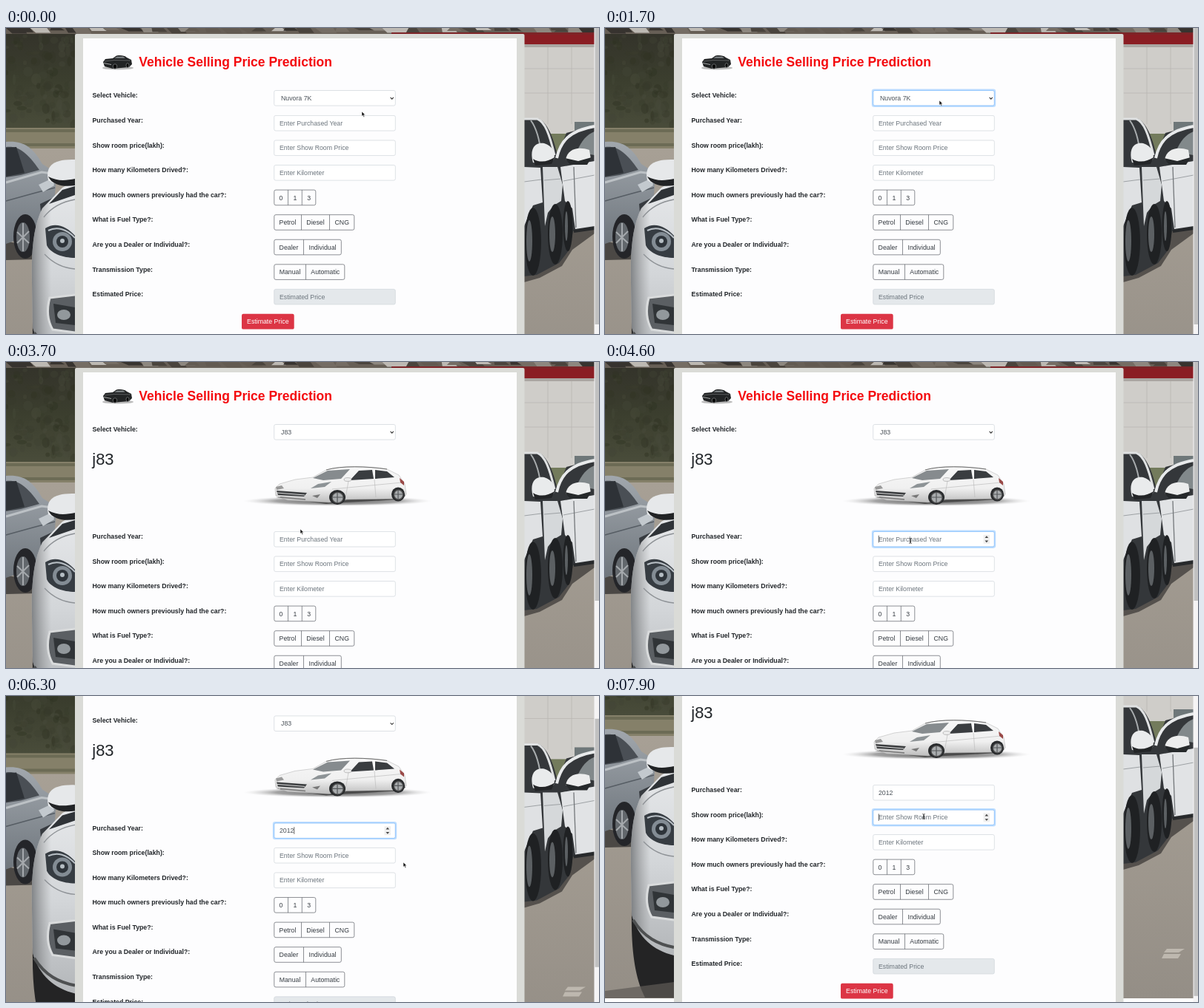
Write an HTML page that moves like this. It is 800 px wide and 414 px high and loops after 8 s.

```html
<!DOCTYPE html>
<html lang="en">
<head>
<meta charset="utf-8">
<title>Vehicle Selling Price Prediction</title>
<style>
html, body { margin: 0; width: 100%; height: 100%; overflow: hidden; background: #fff; }
svg { display: block; width: 100%; height: 100%; }
text { font: 8.755px "Liberation Sans", Arial, sans-serif; fill: #495057; white-space: pre; }
.label { font-weight: bold; fill: #212529; }
.title { font-size: 17.5px; font-weight: bold; fill: #f40b0f; }
.head { font-size: 21.9px; fill: #212529; }
.hint { fill: #6c757d; }
.btn { fill: #343a40; text-anchor: middle; }
.box { fill: #fff; stroke: #ced4da; stroke-width: .7; }
.off { fill: #e4e8eb; }
.group { fill: none; stroke: #5c6167; stroke-width: .7; }
.glow { fill: none; stroke: #bfdeff; stroke-width: 2.2; }
.edge { fill: none; stroke: #80bdff; stroke-width: .7; }
.scroll { --k: 1; animation: scroll 8s linear infinite; }
.thumb { --k: -.76; }
.rest { animation: grow 8s step-end infinite; }
.pointer { animation: point 8s ease-in-out infinite; }
@keyframes scroll {
  0%, 74.4% { transform: translateY(0); }
  78.75% { transform: translateY(calc(var(--k) * -57.4px)); animation-timing-function: ease-out; }
  85.5%, 100% { transform: translateY(calc(var(--k) * -109px)); }
}
@keyframes grow {
  0% { transform: translateY(0); }
  26.25%, 100% { transform: translateY(111px); }
}
@keyframes point {
  0%, 3% { transform: translate(480px, 113px); }
  14%, 35% { transform: translate(451px, 98px); }
  46.25% { transform: translate(397px, 226px); }
  52%, 70% { transform: translate(412px, 242px); }
  74.5%, 86% { transform: translate(536px, 225px); }
  91.25%, 92.5% { transform: translate(462px, 187px); }
  95.5%, 100% { transform: translate(430px, 163px); }
}
</style>
</head>
<body>
<svg viewBox="0 0 800 414" preserveAspectRatio="none">
  <defs>
    <linearGradient id="trees" x2="0" y2="1">
      <stop offset="0" stop-color="#33322a"/><stop offset=".5" stop-color="#3b3e2e"/><stop offset="1" stop-color="#4a4d3b"/>
    </linearGradient>
    <linearGradient id="ground" x2="0" y2="1">
      <stop offset="0" stop-color="#b0a89c"/><stop offset="1" stop-color="#948e86"/>
    </linearGradient>
    <linearGradient id="white" x2="0" y2="1">
      <stop offset="0" stop-color="#e6e8ea"/><stop offset=".5" stop-color="#d3d6d9"/><stop offset="1" stop-color="#b3b6b9"/>
    </linearGradient>
    <linearGradient id="side">
      <stop offset="0" stop-color="#55585b" stop-opacity=".65"/><stop offset=".45" stop-color="#777" stop-opacity="0"/>
    </linearGradient>
    <linearGradient id="silver" x2="0" y2="1">
      <stop offset="0" stop-color="#a1a7ad"/><stop offset="1" stop-color="#6f767d"/>
    </linearGradient>
    <linearGradient id="body" x2="0" y2="1">
      <stop offset="0" stop-color="#f7f7f7"/><stop offset=".6" stop-color="#f0f0f0"/><stop offset="1" stop-color="#bdbdbd"/>
    </linearGradient>
    <radialGradient id="shade">
      <stop offset="0" stop-color="#444" stop-opacity=".9"/><stop offset=".65" stop-color="#666" stop-opacity=".6"/><stop offset="1" stop-color="#ccc" stop-opacity="0"/>
    </radialGradient>
  </defs>

  <g class="scroll">
    <!-- backdrop, left -->
    <rect width="800" height="518" fill="url(#ground)"/>
    <rect width="100" height="140" fill="url(#trees)"/>
    <g id="leaves"></g>
    <rect y="135" width="100" height="28" fill="#858069"/>
    <path d="M0 139H93M0 158H93" stroke="#6c6b55" stroke-width="4"/>
    <path d="M0 288L42 298L42 313L0 314Z" fill="#4b4845"/>
    <path d="M0 154C22 152 36 160 49 184L63 193L67 212L65 240L58 264L40 278L0 292Z" fill="url(#silver)"/>
    <path d="M0 161C15 159 27 166 45 192L20 199L0 202Z" fill="#4a4f55"/>
    <path d="M0 162L14 161L25 196L0 201Z" fill="#2e3237"/>
    <path d="M0 209L48 195L63 197" fill="none" stroke="#bcc1c5" stroke-width="3"/>
    <path d="M0 234L36 224L66 216" fill="none" stroke="#565d64" stroke-width="1.5"/>
    <path d="M44 212L63 203L65 213L50 222Z" fill="#c3c9ce"/>
    <path d="M46 238L65 229L62 250L48 261Z" fill="#373b40"/>
    <ellipse cx="26" cy="282" rx="16" ry="30" fill="#242529"/>
    <ellipse cx="23" cy="283" rx="9" ry="20" fill="#62676c"/>
    <path d="M23 264V302M15 276L31 291M15 291L31 275" stroke="#a5a9ad" stroke-width="2"/>
    <path d="M36 398L60 438L93 450V517H54C40 490 35 450 36 398Z" fill="#242425"/>
    <path d="M0 508L93 496V518H0Z" fill="#5f5b56" opacity=".7"/>
    <g id="suv">
      <path d="M93 206L76 216L49 244C37 268 34 300 35 345L36 405C45 436 65 453 93 460Z" fill="url(#white)"/>
      <path d="M93 206L76 216L49 244C37 268 34 300 35 345L36 405C45 436 65 453 93 460Z" fill="url(#side)"/>
      <path d="M93 214L76 219L58 238L93 226Z" fill="#2f3337"/>
      <path d="M93 232C76 235 61 243 51 256M52 306C66 321 80 325 93 326" fill="none" stroke="#8e9296" stroke-width="1.3"/>
      <path d="M53 271C66 262 82 268 93 281V311C77 311 60 305 55 294Z" fill="#363c42"/>
      <path d="M57 274C69 268 82 272 93 284" fill="none" stroke="#b9c0c6" stroke-width="2"/>
      <circle cx="76" cy="289" r="13" fill="#838c94"/><circle cx="76" cy="289" r="8" fill="#2e343a"/><circle cx="76" cy="288" r="3" fill="#b5bdc3"/>
      <path d="M93 361L59 365C55 380 56 396 63 408L93 412" fill="#5b5f63" stroke="#d9dbdc" stroke-width="3"/>
      <path d="M64 373L93 378V402L67 399Z" fill="#303437"/><ellipse cx="78" cy="388" rx="9" ry="7" fill="#92989c"/>
      <path d="M38 412C53 436 72 445 93 449" fill="none" stroke="#4e5051" stroke-width="4"/>
      <path d="M57 206C53 188 62 177 93 178V210C78 213 65 212 57 206Z" fill="#e6e8ea"/>
      <path d="M57 201C70 208 82 206 93 204V213C80 215 63 214 57 201Z" fill="#212325"/>
    </g>

    <!-- backdrop, right -->
    <rect x="695" width="105" height="150" fill="#cfcdc9"/>
    <path d="M699 55H794M699 88H794M731 26V130M763 26V130" stroke="#b9b7b3" stroke-width=".8"/>
    <rect x="695" y="8" width="105" height="15" fill="#8a1d23"/>
    <rect x="695" y="22" width="105" height="4" fill="#aaa6a2"/>
    <rect x="767" y="127" width="27" height="17" fill="#6e7779"/>
    <rect x="695" y="143" width="105" height="28" fill="#737b5c"/>
    <path d="M699 270H794V278L764 300L750 322L720 338L699 344Z" fill="#55514d"/>
    <path d="M699 122H718C730 128 738 146 744 172L756 142L794 132V270L765 275L760 300L746 318L716 334L699 336Z" fill="#34373a"/>
    <path d="M699 123H717C727 127 733 143 740 172" fill="none" stroke="#dfe1e2" stroke-width="3"/>
    <path d="M708 125C716 136 720 150 722 172" fill="none" stroke="#a9adaf" stroke-width="2"/>
    <path d="M743 176C748 153 760 139 794 133" fill="none" stroke="#e8eaeb" stroke-width="4"/>
    <path d="M770 168C776 152 784 144 794 140V172Z" fill="#82898b"/>
    <path d="M699 188L721 189L724 236L711 240L704 256L699 268Z" fill="#dfe1e3"/>
    <path d="M724 188L744 188L751 212L749 234L739 240L731 250L727 268Z" fill="#d5d8da"/>
    <path d="M748 188L794 180V268L768 272L764 244L754 234Z" fill="#e1e3e5"/>
    <path d="M699 208L722 205M726 206L749 204M752 207L794 199" stroke="#9da1a4" fill="none"/>
    <path d="M766 188L769 270" stroke="#74787b" stroke-width="1.3"/>
    <path d="M766 275L794 271" stroke="#27292b" stroke-width="4"/>
    <g fill="#1f2123">
      <ellipse cx="711" cy="289" rx="11" ry="46"/><ellipse cx="741" cy="279" rx="10" ry="41"/><ellipse cx="758" cy="268" rx="6.5" ry="34"/>
    </g>
    <g fill="#5c6063">
      <ellipse cx="706" cy="288" rx="4" ry="28"/><ellipse cx="737" cy="279" rx="4" ry="24"/><ellipse cx="756" cy="268" rx="2" ry="20"/>
    </g>
    <path d="M711 182C706 164 713 154 726 156C737 159 742 169 739 178L726 184Z" fill="#e9ebec"/>
    <path d="M711 177C720 183 731 181 740 175L736 184L714 186Z" fill="#232527"/>
    <path d="M755 178C758 163 772 160 787 165L789 177L772 182Z" fill="#eceded"/>
    <path d="M754 176L772 180L790 175L784 185H761Z" fill="#26292b"/>
    <path d="M758 451H782L774 456H754ZM754 458H777L773 464H751Z" fill="#beb8af"/>
    <g id="strip"></g>

    <!-- card -->
    <rect x="93" y="8" width="606.5" height="540" rx="2" fill="#dadbd7"/>
    <rect x="104" y="14" width="585" height="540" fill="#fdfdfe"/>
    <g>
      <ellipse cx="151" cy="54" rx="21" ry="2.5" fill="#bbb"/>
      <path d="M131 46L134 42L144 41L149 37.5C154 36.5 160 37 163 40L169 43L170 49L166 53L144 55L133 52Z" fill="#222425"/>
      <path d="M146 41L150 38.5L158 38.5L161 41Z" fill="#777c7e"/>
      <path d="M133 45L146 43.5L168 44" fill="none" stroke="#77797a" stroke-width=".7"/>
      <path d="M132 47.5L142 49.5" stroke="#a5a7a8"/>
      <g fill="#080808" stroke="#77797a" stroke-width=".8"><ellipse cx="147" cy="52" rx="2.8" ry="3.3"/><ellipse cx="164" cy="50.5" rx="2" ry="3"/></g>
    </g>
    <text class="title" x="179.3" y="52">Vehicle Selling Price Prediction</text>
    <g id="top"></g>
    <g id="car">
      <ellipse cx="447" cy="188" rx="127" ry="7" fill="url(#shade)"/>
      <path d="M364 183L432 192L458 190L530 186L539 181L535 177L440 182Z" fill="#4a4a4a"/>
      <path d="M363 171L369 165L390 159L414 156L432 146C452 140 488 141 514 145L530 153L538 165L540 179L529 185L460 186L436 190L380 187L364 181Z" fill="url(#body)" stroke="#aaa" stroke-width=".5"/>
      <path d="M414 157L434 147L464 145L452 158L428 160Z" fill="#868b8e"/>
      <path d="M464 160L476 147L494 146L496 158ZM498 146L514 148L524 156L498 158Z" fill="#3a3d40"/>
      <path d="M432 146C452 140 488 141 514 145" fill="none" stroke="#6a6a6a" stroke-width="1"/>
      <path d="M462 161L458 184M497 159L499 183M440 172L534 163" fill="none" stroke="#bdbdbd" stroke-width=".7"/>
      <path d="M411 171L421 165L439 162L430 169Z" fill="#8d9396"/>
      <path d="M364 169L372 167L375 171L365 173Z" fill="#999"/>
      <path d="M365 174L406 177L402 182L367 180Z" fill="#3b3d3f"/>
      <path d="M366 177L403 180" stroke="#ddd" stroke-width="1"/>
      <path d="M370 183L404 186" stroke="#777" stroke-width="1.5"/>
      <path d="M413 181L424 179L420 184Z" fill="#777"/>
      <ellipse cx="461" cy="159" rx="5" ry="2.4" fill="#eee" stroke="#888" stroke-width=".5"/>
      <path d="M531 157L537 162L537 167L532 163Z" fill="#9a4a48"/>
      <g fill="#292b2d"><ellipse cx="447" cy="183" rx="11" ry="10"/><ellipse cx="529" cy="179" rx="9" ry="9.6"/></g>
      <g fill="#a9acae" stroke="#555" stroke-width="1.2"><ellipse cx="447.5" cy="183.5" rx="7.5" ry="7"/><ellipse cx="529.5" cy="179.5" rx="6" ry="6.4"/></g>
      <path d="M447 177V190M440 183H455M529 173V186M523 179H536" stroke="#55585a" stroke-width="1.2"/>
    </g>
    <g class="rest" id="rest"></g>
  </g>

  <rect x="793.5" width="6.5" height="414" fill="#f5f4f5"/>
  <g class="scroll thumb" id="thumb"></g>
  <g class="pointer">
    <path id="arrow" d="M0 0V6.3L1.5 5L2.6 7.4L3.7 6.9L2.6 4.6H4.6Z" fill="#111" stroke="#fff" stroke-width=".5"/>
    <path id="beam" d="M-1.7 -3.4Q0 -3.4 0 -2.4V2.4Q0 3.4 -1.7 3.4M1.7 -3.4Q0 -3.4 0 -2.4V2.4Q0 3.4 1.7 3.4M-.8 .9H.8" fill="none" stroke="#222" stroke-width=".8"/>
  </g>
</svg>
<script>
const LOOP = 8000, LEFT = 361.5, WIDE = 164;
const $ = id => document.getElementById(id);
const sheet = document.head.appendChild(document.createElement('style'));
const pct = ms => ms / LOOP * 100 + '%';
let spans = 0;

// Style for something visible only during the given [from, to] periods, in ms.
function during(...periods) {
  const name = 'span' + spans++;
  const steps = periods.map(([a, b]) =>
    `${pct(a)}{visibility:visible}` + (b < LOOP ? `${pct(b)}{visibility:hidden}` : '')).join('');
  const first = periods[0][0] > 0 ? '0%{visibility:hidden}' : '';
  const end = periods[periods.length - 1][1] < LOOP ? 'hidden' : 'visible';
  sheet.append(`@keyframes ${name}{${first}${steps}100%{visibility:${end}}}`);
  return `animation:${name} 8s step-end infinite`;
}
const when = (periods, inner) => `<g style="${during(...periods)}">${inner}</g>`;

const text = (x, y, str, cls = '') => `<text x="${x}" y="${y}" class="${cls}">${str}</text>`;
const rect = (x, y, w, h, cls) => `<rect x="${x}" y="${y}" width="${w}" height="${h}" rx="2.2" class="${cls}"/>`;
const label = (y, str) => text(116.5, y - .7, str, 'label');
const box = (y, cls = '') => rect(LEFT + .2, y - 10.4, WIDE - .4, 20.6, 'box ' + cls);
const ring = y => rect(LEFT - .6, y - 11.2, WIDE + 1.2, 22.2, 'glow') + rect(LEFT + .2, y - 10.4, WIDE - .4, 20.6, 'edge');
const caret = (x, y) => `<path d="M${x} ${y - 5}v9.6" stroke="#222" stroke-width=".7"/>`;
const spinner = y => `<path d="M510.5 ${y - 6}h8.5v12h-8.5z" fill="#efefef"/>
  <path d="M512.5 ${y - 1.8}l2.3 -2.7l2.3 2.7zM512.5 ${y + 1.8}l2.3 2.7l2.3 -2.7z" fill="#444"/>`;
const hint = (y, str) => text(369, y + 3, str, 'hint');

function choices(y, edges, names) {
  const mid = i => (edges[i] + edges[i + 1]) / 2;
  return rect(LEFT + .3, y - 10.4, edges[edges.length - 1] - LEFT - .5, 20.6, 'group') +
    edges.slice(1, -1).map(x => `<path d="M${x} ${y - 10.4}v20.6" class="group"/>`).join('') +
    names.map((n, i) => text(mid(i), y + 3, n, 'btn')).join('');
}

const GROW = 2100, FOCUS = 4400, MOVE_ON = 7700;
const keys = [4800, 5000, 5300, 5650], year = '2012';

$('top').innerHTML = label(94.4, 'Select Vehicle:') + box(94.9) +
  when([[0, GROW]], text(371, 97.9, 'Nuvora 7K')) +
  when([[GROW, LOOP]], text(371, 97.9, 'J83') + text(116.3, 138.8, 'j83', 'head')) +
  '<path d="M518.6 93.9l2.1 2.2l2.1 -2.2" fill="none" stroke="#333" stroke-width="1.1"/>' +
  when([[1700, 3000]], ring(94.9));

const rowY = i => 128.8 + i * 33.57;
const labels = ['Purchased Year:', 'Show room price(lakh):', 'How many Kilometers Drived?:',
  'How much owners previously had the car?:', 'What is Fuel Type?:',
  'Are you a Dealer or Individual?:', 'Transmission Type:', 'Estimated Price:'];

const typed = keys.map((t, i) => {
  const end = keys[i + 1] || LOOP;
  return when([[t, end]], text(369, rowY(0) + 3, year.slice(0, i + 1))) +
    when([[t, Math.min(end, MOVE_ON)]], caret(369.3 + (i + 1) * 4.87, rowY(0)));
}).join('');

$('rest').innerHTML = labels.map((s, i) => label(rowY(i), s)).join('') +
  [0, 1, 2].map(i => box(rowY(i))).join('') + box(rowY(7), 'off') +
  when([[0, keys[0]]], hint(rowY(0), 'Enter Purchased Year')) +
  hint(rowY(1), 'Enter Show Room Price') + hint(rowY(2), 'Enter Kilometer') +
  hint(rowY(7), 'Estimated Price') +
  when([[FOCUS, MOVE_ON]], ring(rowY(0)) + spinner(rowY(0))) +
  when([[FOCUS, keys[0]]], caret(369.3, rowY(0))) + typed +
  when([[MOVE_ON, LOOP]], ring(rowY(1)) + spinner(rowY(1)) + caret(369.3, rowY(1))) +
  choices(rowY(3), [LEFT, 380.5, 399.3, 418], ['0', '1', '3']) +
  choices(rowY(4), [LEFT, 398.5, 436.5, 470], ['Petrol', 'Diesel', 'CNG']) +
  choices(rowY(5), [LEFT, 401.5, 452.5], ['Dealer', 'Individual']) +
  choices(rowY(6), [LEFT, 404.5, 457], ['Manual', 'Automatic']) +
  '<rect x="318" y="386.8" width="70.7" height="20.8" rx="2.2" fill="#dc3545"/>' +
  '<text x="353.3" y="400.2" class="btn" style="fill:#fff">Estimate Price</text>';

const bar = h => `<rect x="794.5" y="-13" width="5.5" height="${h}" fill="#c1c1c1"/>`;
$('thumb').innerHTML = when([[0, GROW]], bar(414)) + when([[GROW, LOOP]], bar(336));

$('car').style = during([2700, LOOP]);
$('arrow').style = during([0, 3800], [5850, 7500]);
$('beam').style = during([3800, 5850], [7500, LOOP]);

// Soft texture of the foliage and the row of parked cars along the top edge.
let seed = 7;
const rnd = () => (seed = seed * 16807 % 2147483647) / 2147483647;
let dabs = '';
for (let i = 0; i < 110; i++) {
  const g = 44 + rnd() * 30;
  dabs += `<ellipse cx="${rnd() * 93}" cy="${10 + rnd() * 122}" rx="${2 + rnd() * 5}" ry="${2 + rnd() * 6}" fill="rgb(${g},${g + 3},${g - 13})" opacity=".4"/>`;
}
$('leaves').innerHTML = dabs;
const tones = ['#4a443d', '#8d877f', '#625a51', '#bdb9b3', '#37332f', '#756d64'];
let strip = '<rect width="800" height="8" fill="#675f56"/>';
for (let x = 0; x < 794; x += 9 + rnd() * 20)
  strip += `<path d="M${x} 0h${8 + rnd() * 18}l5 ${3 + rnd() * 5}h-20z" fill="${tones[rnd() * 6 | 0]}"/>`;
$('strip').innerHTML = strip + '<path d="M520 6H794V9H520Z" fill="#7d2427"/>';
</script>
</body>
</html>
```
